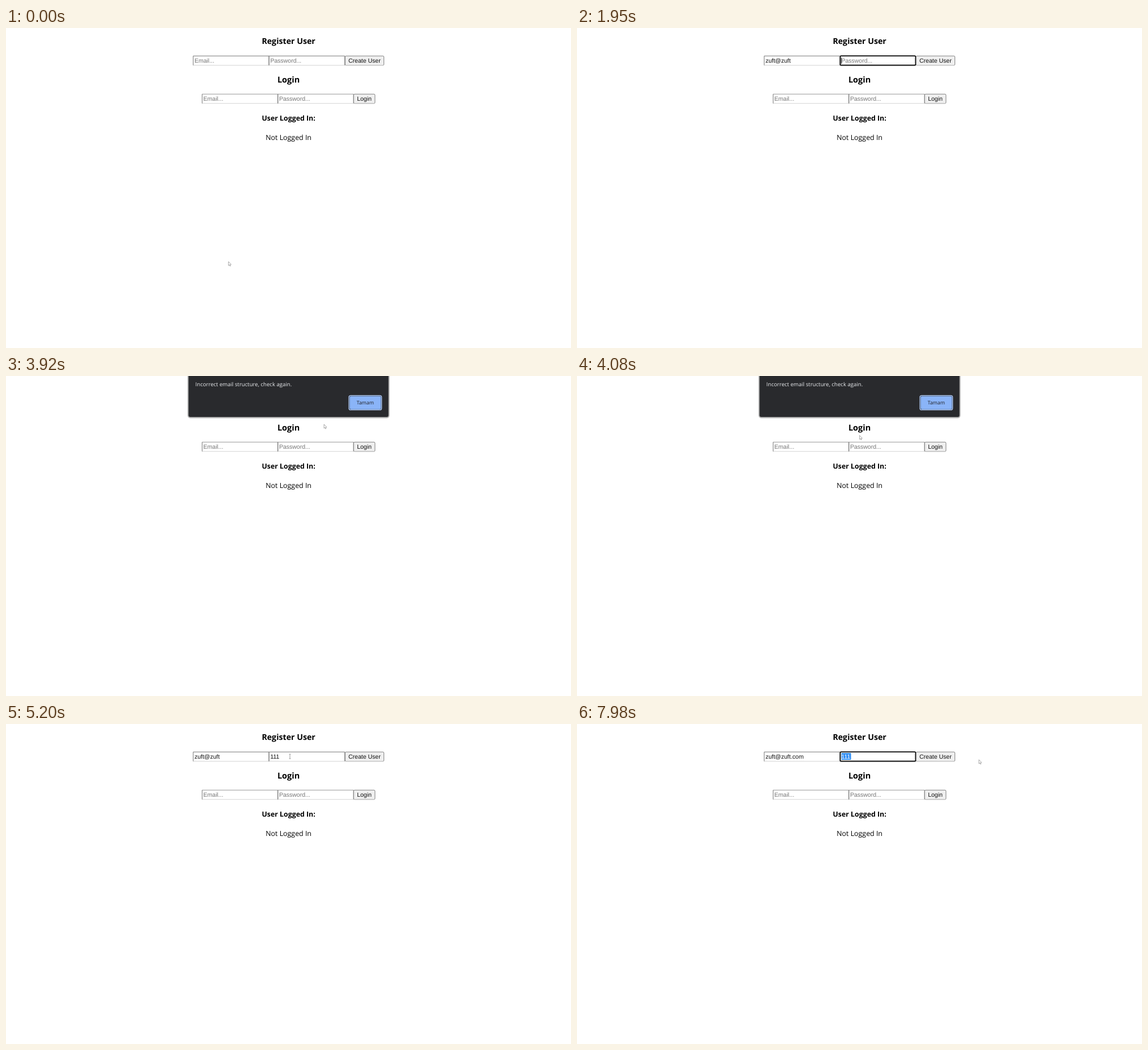
Recreate the animation shown at these times as an HTML page. Size 995x563 px, loop 8000 ms.

```html
<!DOCTYPE html>
<html lang="en">
<head>
<meta charset="utf-8">
<title>Register and login</title>
<style>
  html, body { margin: 0; width: 100%; height: 100%; overflow: hidden; background: #fff; }
  svg { display: block; width: 100%; height: 100%; }
  text { text-rendering: geometricPrecision; white-space: pre; }
  .page { font-family: "Open Sans", "Noto Sans", sans-serif; }
  .control { font: 10.5px "Liberation Sans", Arial, sans-serif; }
  .mid { text-anchor: middle; }
  .bold { font-weight: 700; }
</style>
</head>
<body>
<svg id="stage" viewBox="0 0 995 563"></svg>
<script>
const LOOP = 8000;
const stage = document.getElementById('stage');

function add(parent, tag, attrs = {}, content = '') {
  const node = document.createElementNS('http://www.w3.org/2000/svg', tag);
  set(node, attrs);
  node.textContent = content;
  return parent.appendChild(node);
}

function set(node, attrs) {
  for (const key in attrs) node.setAttribute(key, attrs[key]);
}

const show = (node, on) => set(node, { visibility: on ? 'visible' : 'hidden' });

function heading(content, y, size, cls = 'bold') {
  add(stage, 'text', { class: `page mid ${cls}`, x: 497.6, y, 'font-size': size }, content);
}

function field(x, y, placeholder, topColor) {
  const w = 133.4, h = 16.4;
  const line = (d, stroke) => add(stage, 'path', { d, stroke, fill: 'none' });
  line(`M${x} ${y + h}h${w}`, '#d6d6d6');
  line(`M${x} ${y}h${w}`, topColor);
  line(`M${x} ${y}v${h}M${x + w} ${y}v${h}`, '#777');
  const focus = add(stage, 'rect', {
    x: x + .4, y: y - .1, width: w - .8, height: h, rx: 1.6,
    fill: '#fff', stroke: '#101010', 'stroke-width': 1.8
  });
  const selection = add(stage, 'rect', { x: x + 2.6, y: y + 1.8, width: 16.8, height: 12, fill: '#338ff5' });
  const text = add(stage, 'text', { class: 'control', x: x + 2.2, y: y + 11.3 });
  const caret = add(stage, 'rect', { y: y + 2.8, width: .9, height: 11, fill: '#222' });

  return ({ value = '', focused = false, caretOn = false, selected = false } = {}) => {
    text.textContent = value || placeholder;
    set(text, { fill: selected ? '#fff' : value ? '#111' : '#757575' });
    show(focus, focused);
    show(selection, selected);
    show(caret, focused && caretOn);
    const width = value ? text.getComputedTextLength() : 0;
    set(caret, { x: Math.floor(x + 2.7 + width) });
  };
}

function button(x, y, w, label) {
  const box = add(stage, 'rect', { x, y, width: w, height: 16.4, rx: 1.8, 'stroke-width': .9 });
  add(stage, 'path', { d: `M${x + 1} ${y + 16.4}h${w - 2}`, stroke: '#c4c4c4' });
  add(stage, 'text', { class: 'control mid', x: x + w / 2, y: y + 11.3, fill: '#111' }, label);
  return hover => set(box, hover
    ? { fill: '#e3e3e3', stroke: '#555' }
    : { fill: '#efefef', stroke: '#777' });
}

heading('Register User', 28, 14.2);
const drawEmail = field(329.7, 49.2, 'Email...', '#777');
const drawPassword = field(463.2, 49.2, 'Password...', '#777');
const drawCreate = button(597.2, 49.2, 68.3, 'Create User');

heading('Login', 95.9, 14.5);
field(345.4, 116.3, 'Email...', '#999')();
field(478.7, 116.3, 'Password...', '#999')();
button(612.2, 116.3, 37.6, 'Login')(false);

heading('User Logged In:', 163, 12.35);
heading('Not Logged In', 196.5, 12.4, '');

// Alert box, with its shadow as widening strokes
const dialog = add(stage, 'g', { class: 'page' });
for (const width of [5, 3.4, 1.8]) {
  add(dialog, 'rect', {
    x: 321.7, y: -20, width: 351.7, height: 92.2, rx: 3,
    fill: 'none', stroke: '#000', 'stroke-opacity': .14, 'stroke-width': width
  });
}
add(dialog, 'rect', { x: 321.5, y: -20, width: 352, height: 92, rx: 3, fill: '#292a2d' });
add(dialog, 'text', { x: 333.6, y: 17.6, 'font-size': 9.6, fill: '#e8eaed' },
  'Incorrect email structure, check again.');
const ring = add(dialog, 'rect', {
  x: 603.9, y: 34.3, width: 57.6, height: 25.4, rx: 3,
  fill: 'none', stroke: '#b4cffb', 'stroke-width': 1.3
});
add(dialog, 'rect', { x: 605.2, y: 35.4, width: 55.2, height: 23.3, rx: 2.4, fill: '#8ab4f8' });
add(dialog, 'text', { class: 'mid', x: 632.7, y: 50.3, 'font-size': 8.8, 'font-weight': 500, fill: '#202124' }, 'Tamam');

const arrow = add(stage, 'path', {
  d: 'M0 0V7L1.6 5.6 2.7 8 3.7 7.5 2.7 5.3 4.8 5.1Z',
  fill: '#fff', stroke: '#858585', 'stroke-width': .7
});
const beam = add(stage, 'path', { d: 'M-1.5-4h3M0-4V4M-1.5 4h3', stroke: '#777', 'stroke-width': .7, fill: 'none' });

const ADDRESS = 'zuft@zuft.com';
const typed = n => ADDRESS.slice(0, n);

// Each step holds until the next; unnamed properties carry over.
const steps = [
  [0, { email: {}, password: {}, arrow: [391.8, 411] }],
  [160, { arrow: [393, 330] }],
  [320, { arrow: [394, 205] }],
  [480, { arrow: [390, 105] }],
  [640, { arrow: null, beam: [386, 58] }],
  [800, { email: { focused: true, caretOn: true }, arrow: [385.5, 69.5], beam: null }],
  [1130, { email: { value: typed(9), focused: true, caretOn: true }, arrow: null }],
  [1620, { email: { value: typed(9), focused: true } }],
  [1950, { email: { value: typed(9) }, password: { focused: true, caretOn: true } }],
  [2450, { password: { focused: true } }],
  [2950, { password: { value: '11', focused: true, caretOn: true } }],
  [3110, { password: { value: '111', focused: true, caretOn: true } }],
  [3270, { beam: [560, 58] }],
  [3430, { beam: null, arrow: [622, 54], hover: true }],
  [3590, { password: { value: '111' }, arrow: [635.5, 54] }],
  [3920, { hover: false, dialog: { y: 0, opacity: 1, ring: true }, arrow: [560, 85] }],
  [4080, { arrow: [497.6, 104.5] }],
  [4240, { arrow: [530, 94] }],
  [4400, { arrow: [590, 65] }],
  [4560, { arrow: [635, 46] }],
  [4720, { arrow: [643, 43.5] }],
  [4880, { dialog: { y: -5.2, opacity: .9, ring: false } }],
  [5040, { dialog: null, arrow: [600, 50], hover: true }],
  [5200, { arrow: null, beam: [500, 57], hover: false }],
  [5360, { beam: [410, 57] }],
  [5520, { email: { value: typed(9), focused: true, caretOn: true }, beam: [395, 57] }],
  [6020, { email: { value: typed(9), focused: true } }],
  [6520, { email: { value: typed(10), focused: true, caretOn: true }, beam: null }],
  [6680, { email: { value: typed(11), focused: true, caretOn: true } }],
  [6840, { email: { value: typed(12), focused: true, caretOn: true } }],
  [7000, { email: { value: typed(13), focused: true, caretOn: true } }],
  [7160, { email: { value: typed(13) }, password: { value: '111', focused: true, selected: true } }],
  [7820, { arrow: [748, 44] }],
  [7980, { arrow: [707.8, 62.8] }]
];

function place(node, point) {
  show(node, point);
  if (point) set(node, { transform: `translate(${point})` });
}

function render(time) {
  const state = {};
  for (const [start, change] of steps) {
    if (start <= time) Object.assign(state, change);
  }
  drawEmail(state.email);
  drawPassword(state.password);
  drawCreate(state.hover);
  set(dialog, { display: state.dialog ? 'inline' : 'none' });
  if (state.dialog) {
    set(dialog, { transform: `translate(0 ${state.dialog.y})`, opacity: state.dialog.opacity });
    show(ring, state.dialog.ring);
  }
  place(arrow, state.arrow);
  place(beam, state.beam);
}

const begin = performance.now();
function tick() {
  render((performance.now() - begin) % LOOP);
  requestAnimationFrame(tick);
}
tick();
</script>
</body>
</html>
```
